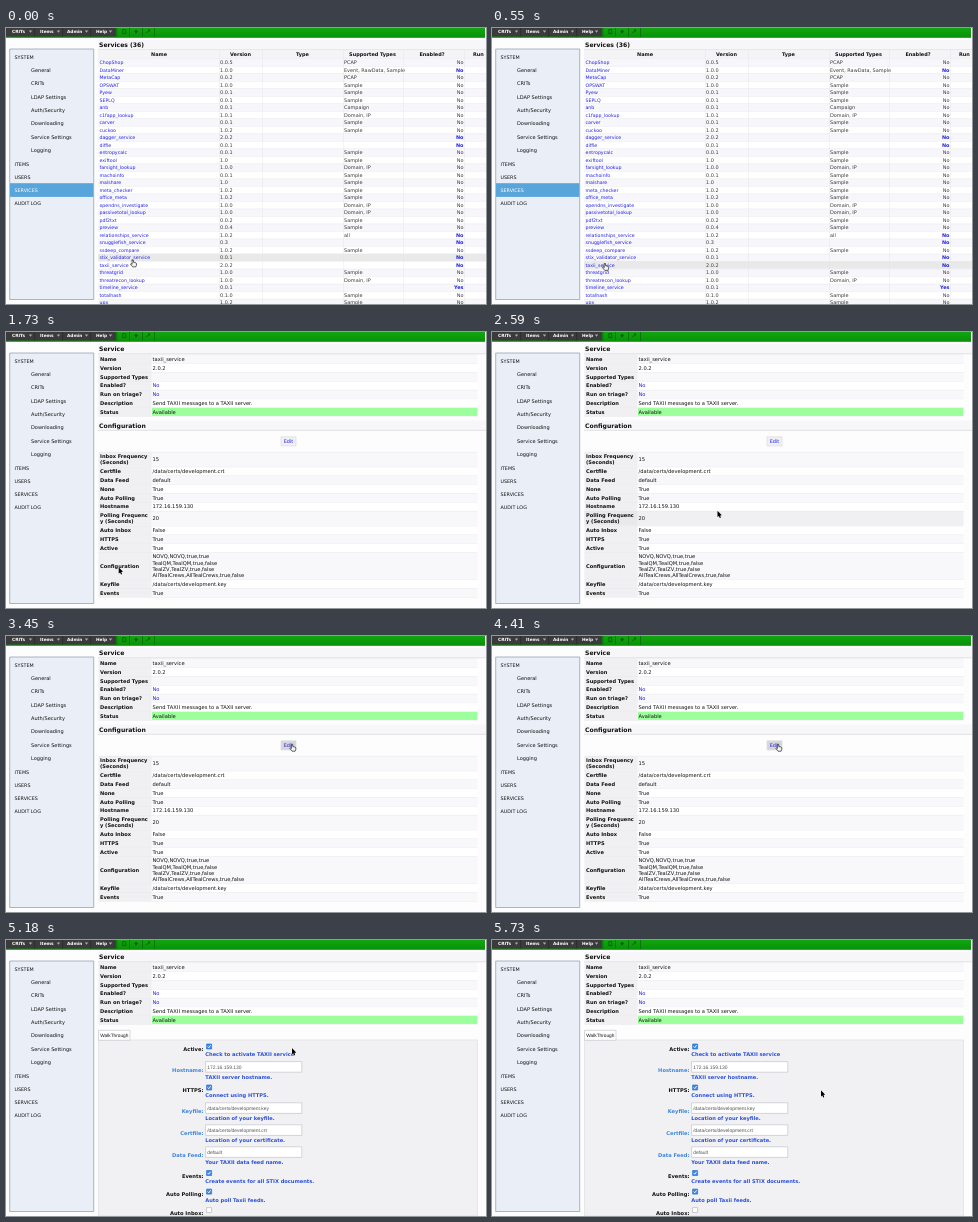
An HTML page with a canvas for the animation above (5.78 s loop, 480 by 276 pixels).

```html
<!DOCTYPE html>
<html lang="en">
<head>
<meta charset="utf-8">
<title>Service admin</title>
<style>
html, body { margin: 0; width: 100%; height: 100%; overflow: hidden; background: #fff; }
canvas { display: block; width: 480px; height: 276px; }
</style>
</head>
<body>
<canvas id="stage" width="480" height="276"></canvas>
<script>
const ctx = document.getElementById('stage').getContext('2d');
const LOOP = 5780;
const BLANK_AT = 690, DETAIL_AT = 1640, MOVE_AT = 1740, FORM_AT = 4640;
const SANS = '"DejaVu Sans", Verdana, sans-serif';
const ARIAL = '"Liberation Sans", Arial, sans-serif';
const INK = '#111', LINK = '#2323e0', HELP = '#2a50d8', FIELD = '#3f86dc';
const LINE = '#e3e3e8', HOVER = '#f0f0f2';

ctx.textRendering = 'geometricPrecision';

function rect(x, y, w, h, fill, stroke) {
  if (fill) {
    ctx.fillStyle = fill;
    ctx.fillRect(x, y, w, h);
  }
  if (stroke) {
    ctx.strokeStyle = stroke;
    ctx.lineWidth = 0.7;
    ctx.strokeRect(x, y, w, h);
  }
}

// y is the middle of the capitals
function text(str, x, y, { size = 5.15, color = INK, bold = false, align = 'left', family = SANS } = {}) {
  ctx.font = `${bold ? 'bold ' : ''}${size}px ${family}`;
  ctx.fillStyle = color;
  ctx.textAlign = align;
  ctx.fillText(str, x, y + size * 0.365);
}

function path(points, fill, stroke, width = 0.8) {
  ctx.beginPath();
  points.forEach(([x, y], i) => i ? ctx.lineTo(x, y) : ctx.moveTo(x, y));
  if (fill) {
    ctx.closePath();
    ctx.fillStyle = fill;
    ctx.fill();
  }
  if (stroke) {
    ctx.strokeStyle = stroke;
    ctx.lineWidth = width;
    ctx.lineJoin = 'round';
    ctx.stroke();
  }
}

// Pointer motion: time, position and easing towards it
const easeIn = u => u ** 1.5;
const easeOut = u => 1 - (1 - u) ** 1.5;
const smooth = u => u * u * (3 - 2 * u);
const MOVES = [
  [50, 126.7, 232],
  [500, 112.8, 235.5, smooth],
  [MOVE_AT, 112.8, 235.5],
  [2140, 155, 187.5, easeIn],
  [2450, 225.6, 179, easeOut],
  [2590, 225.6, 179],
  [3120, 286, 108.3, smooth],
  [5180, 286, 108.3],
  [5720, 329, 150.4, smooth]
];

function pointerAt(t) {
  const next = MOVES.findIndex(m => m[0] > t);
  if (next === 0) return { x: MOVES[0][1], y: MOVES[0][2] };
  if (next < 0) {
    const [, x, y] = MOVES[MOVES.length - 1];
    return { x, y };
  }
  const [t0, x0, y0] = MOVES[next - 1];
  const [t1, x1, y1, ease = smooth] = MOVES[next];
  const k = ease((t - t0) / (t1 - t0));
  return { x: x0 + (x1 - x0) * k, y: y0 + (y1 - y0) * k };
}

function arrow(x, y) {
  const shape = [[0, 0], [0, 6], [1.3, 4.8], [2.3, 7], [3.2, 6.6], [2.3, 4.4], [4.1, 4.3]];
  const pts = shape.map(([a, b]) => [x + a, y + b]);
  path(pts, '#000', 'rgba(255,255,255,.8)', 0.6);
  path(pts, '#000');
}

function hand(x, y) {
  const shape = [[-0.6, 0], [0.6, 0], [0.9, 2.4], [2.2, 2.5], [3.4, 3], [3.9, 3.7],
    [3.7, 5.4], [3.1, 6.9], [0, 6.9], [-1.4, 5.2], [-2.2, 4], [-1.4, 3.6], [-0.6, 4.3], [-0.6, 0]];
  path(shape.map(([a, b]) => [x + a, y + b]), '#f4f4f4', '#222', 0.7);
}

function menuBar() {
  const g = ctx.createLinearGradient(0, 0, 0, 9);
  g.addColorStop(0, '#12a512');
  g.addColorStop(1, '#079307');
  rect(0, 0, 479, 9.8, g);
  rect(0, 0, 110, 8.6, '#3b3b3b');
  [['CRITs', 6, 24.5], ['Items', 34, 52.5], ['Admin', 61, 80.5], ['Help', 90, 104.5]].forEach(([name, x, ax]) => {
    text(name, x, 3.9, { size: 4.3, bold: true, color: '#fff' });
    path([[ax - 1.7, 2.5], [ax + 1.7, 2.5], [ax, 4.8]], '#aaa');
  });
  [28.5, 56.5, 84.5].forEach(x => rect(x, 0, 0.6, 8.6, '#222'));
  [110.5, 123, 136, 148].forEach(x => rect(x, 0, 0.8, 9, '#0a6a0a'));
  rect(116.8, 1.6, 3, 4, null, '#084f08');
  path([[128.5, 3.2], [130, 1.8], [131.8, 3.4], [130, 5.4]], '#084f08');
  path([[140.5, 5], [143.6, 1.9]], null, '#084f08');
  path([[142, 1.9], [143.6, 1.9], [143.6, 3.4]], null, '#084f08');
}

const SUBMENU = ['General', 'CRITs', 'LDAP Settings', 'Auth/Security', 'Downloading', 'Service Settings', 'Logging'];
const SECTIONS = ['ITEMS', 'USERS', 'SERVICES', 'AUDIT LOG'];

function sidebar(top, selected) {
  rect(3.7, top, 84, 250.5, '#e9eef7', '#8e98a8');
  text('SYSTEM', 8.5, top + 8.3, { size: 4.8 });
  SUBMENU.forEach((name, i) => text(name, 25, top + 21.1 + i * 13.38, { size: 5.02 }));
  SECTIONS.forEach((name, i) => {
    const y = top + 115 + i * 13.05;
    const on = name === selected;
    if (on) rect(4, y - 6.9, 83.4, 13.7, '#58a5dc');
    text(name, 8.5, y, { size: 4.8, color: on ? '#fff' : INK });
  });
}

function heading(str, y) {
  rect(92, y - 5, 388, 9.5, '#f7f7fa');
  rect(92, y + 4.4, 388, 0.6, '#cfcfd6');
  text(str, 93, y, { size: 6.1, bold: true });
}

// name | version | supported types
const SERVICES = `ChopShop|0.0.5|PCAP
DataMiner|1.0.0|Event, RawData, Sample
MetaCap|0.0.2|PCAP
OPSWAT|1.0.0|Sample
Pyew|0.0.1|Sample
SEPLQ|0.0.1|Sample
anb|0.0.1|Campaign
c1fapp_lookup|1.0.1|Domain, IP
carver|0.0.1|Sample
cuckoo|1.0.2|Sample
dagger_service|2.0.2|
diffie|0.0.1|
entropycalc|0.0.1|Sample
exiftool|1.0|Sample
farsight_lookup|1.0.0|Domain, IP
machoinfo|0.0.1|Sample
malshare|1.0|Sample
meta_checker|1.0.2|Sample
office_meta|1.0.2|Sample
opendns_investigate|1.0.0|Domain, IP
passivetotal_lookup|1.0.0|Domain, IP
pdf2txt|0.0.2|Sample
preview|0.0.4|Sample
relationships_service|1.0.2|all
snugglefish_service|0.3|
ssdeep_compare|1.0.2|Sample
stix_validator_service|0.0.1|
taxii_service|2.0.2|
threatgrid|1.0.0|Sample
threatrecon_lookup|1.0.0|Domain, IP
timeline_service|0.0.1|
totalhash|0.1.0|Sample
upx|1.0.2|Sample`.split('\n').map(row => row.split('|'));

function listPage(p) {
  sidebar(21, 'SERVICES');
  heading('Services (36)', 17.2);
  rect(92, 22, 388, 8.4, '#f4f4f7');
  [['Name', 153], ['Version', 234.5], ['Type', 296.5], ['Supported Types', 366.5], ['Enabled?', 426], ['Run', 472.3]]
    .forEach(([label, x]) => text(label, x, 26.6, { size: 4.95, bold: true, align: 'center' }));
  SERVICES.forEach(([name, version, types], i) => {
    const y = 34.3 + i * 7.51, top = y - 3.75;
    const hover = p.y >= top && p.y < top + 7.51;
    rect(92, top, 388, 7.51, hover ? '#e9e9ea' : i % 2 ? '#fff' : '#f6f6fb');
    rect(92, top, 388, 0.4, LINE);
    const cell = { size: 4.95, color: '#3a3a3a' };
    text(name, 93.5, y, { size: 4.7, color: LINK });
    text(version, 214, y, cell);
    text(types, 338, y, cell);
    const toggle = !types || types === 'all' || types.startsWith('Event');
    text(name === 'timeline_service' ? 'Yes' : 'No', 457.5, y,
      { ...cell, align: 'right', bold: toggle, color: toggle ? LINK : cell.color });
  });
  [213, 256, 337, 397, 458].forEach(x => rect(x, 22, 0.4, 254, LINE));
}

const SUMMARY = [
  ['Name', 'taxii_service'], ['Version', '2.0.2'], ['Supported Types', ''], ['Enabled?', 'No'],
  ['Run on triage?', 'No'], ['Description', 'Send TAXII messages to a TAXII server.'], ['Status', 'Available']
];
const SETTINGS = [
  ['Inbox Frequency|(Seconds)', '15'], ['Certfile', '/data/certs/development.crt'],
  ['Data Feed', 'default'], ['None', 'True'], ['Auto Polling', 'True'], ['Hostname', '172.16.159.130'],
  ['Polling Frequenc|y (Seconds)', '20'], ['Auto Inbox', 'False'], ['HTTPS', 'True'], ['Active', 'True'],
  ['Configuration', 'NOVQ,NOVQ,true,true|TealQM,TealQM,true,false|TealZV,TealZV,true,false|AllTealCrews,AllTealCrews,true,false'],
  ['Keyfile', '/data/certs/development.key'], ['Events', 'True']
];

function table(rows, top, p) {
  rows.forEach(([label, value], i) => {
    const labels = label.split('|'), values = value.split('|');
    const lines = Math.max(labels.length, values.length);
    const h = 8.82 + (lines - 1) * 6.1;
    const mid = top + h / 2;
    const hover = p.moved && p.x > 92 && p.x < 472 && p.y >= top && p.y < top + h;
    rect(92.5, top, 379, h, hover ? HOVER : i % 2 ? '#fff' : '#f8f8fb');
    rect(92.5, top, 53, h, hover ? '#e9e9ec' : '#f0f0f3');
    if (value === 'Available') rect(146, top + 0.4, 325.5, h - 0.8, '#9cff9c');
    rect(92.5, top, 379, 0.4, LINE);
    const put = (list, x, style) => list.forEach((s, n) =>
      text(s, x, mid + (n - (list.length - 1) / 2) * 6.3, style));
    put(labels, 94, { size: 5.08, bold: true });
    put(values, 146.5, { color: value === 'No' ? LINK : INK });
    top += h;
  });
  rect(92.5, top, 379, 0.4, LINE);
}

function summary(p) {
  sidebar(21);
  heading('Service', 17.2);
  table(SUMMARY, 22.6, p);
}

const overEdit = p => p.x > 275 && p.x < 290 && p.y > 105 && p.y < 114;

function detailPage(p) {
  summary(p);
  heading('Configuration', 93.5);
  rect(275, 104.8, 15, 9.2, overEdit(p) ? '#d6d6da' : '#f0f0f4', '#dcdce2');
  text('Edit', 282.5, 109.5, { size: 4.95, color: LINK, align: 'center' });
  table(SETTINGS, 119.9, p);
}

function checkbox(y, on) {
  rect(200.6, y - 2.5, 5, 5, on ? '#3c89e6' : '#fff', on ? '#2f74cc' : '#bbb');
  if (on) path([[201.7, y], [202.8, y + 1.2], [204.6, y - 1.3]], null, '#fff', 0.9);
}

// label, middle of the control, help, field text (none for a checkbox)
const FORM = [
  ['Active', 106.5, 'Check to activate TAXII service'],
  ['Hostname', 127, 'TAXII server hostname.', '172.16.159.130'],
  ['HTTPS', 147.5, 'Connect using HTTPS.'],
  ['Keyfile', 168.2, 'Location of your keyfile.', '/data/certs/development.key'],
  ['Certfile', 190.2, 'Location of your certificate.', '/data/certs/development.crt'],
  ['Data Feed', 212.2, 'Your TAXII data feed name.', 'default'],
  ['Events', 233, 'Create events for all STIX documents.'],
  ['Auto Polling', 251.6, 'Auto poll Taxii feeds.'],
  ['Auto Inbox', 270.1, '']
];

function formPage(p) {
  summary(p);
  rect(92.5, 100, 379, 176, '#f1f1f3', '#dedee3');
  rect(92.5, 90.3, 31.5, 10, '#fff', '#c8c8ce');
  text('WalkThrough', 94.3, 95.3, { size: 4.75, family: ARIAL });
  FORM.forEach(([label, y, help, value]) => {
    const field = value !== undefined;
    text(label + ':', 197.5, y + 3, { bold: true, align: 'right', color: field ? FIELD : INK });
    if (field) {
      rect(199.6, y - 5.4, 96.2, 10.6, '#fff', '#c4c4ca');
      text(value, 201.2, y + 0.2, { size: 4.95, color: '#555', family: ARIAL });
    } else {
      checkbox(y, help !== '');
    }
    text(help, 199.3, y + (field ? 9.7 : 8.1), { bold: true, color: HELP, size: 5.1 });
  });
}

function draw(t) {
  const p = { ...pointerAt(t), moved: t > MOVE_AT };
  rect(0, 0, 480, 276, '#fdfdfe');
  if (t < BLANK_AT) listPage(p);
  else if (t < DETAIL_AT) sidebar(26.2);
  else if (t < FORM_AT) detailPage(p);
  else formPage(p);
  menuBar();
  const onLink = t < BLANK_AT || (t >= DETAIL_AT && t < FORM_AT && overEdit(p));
  (onLink ? hand : arrow)(p.x, p.y);
}

const start = performance.now();
function tick() {
  draw((performance.now() - start) % LOOP);
  requestAnimationFrame(tick);
}
tick();
</script>
</body>
</html>
```
